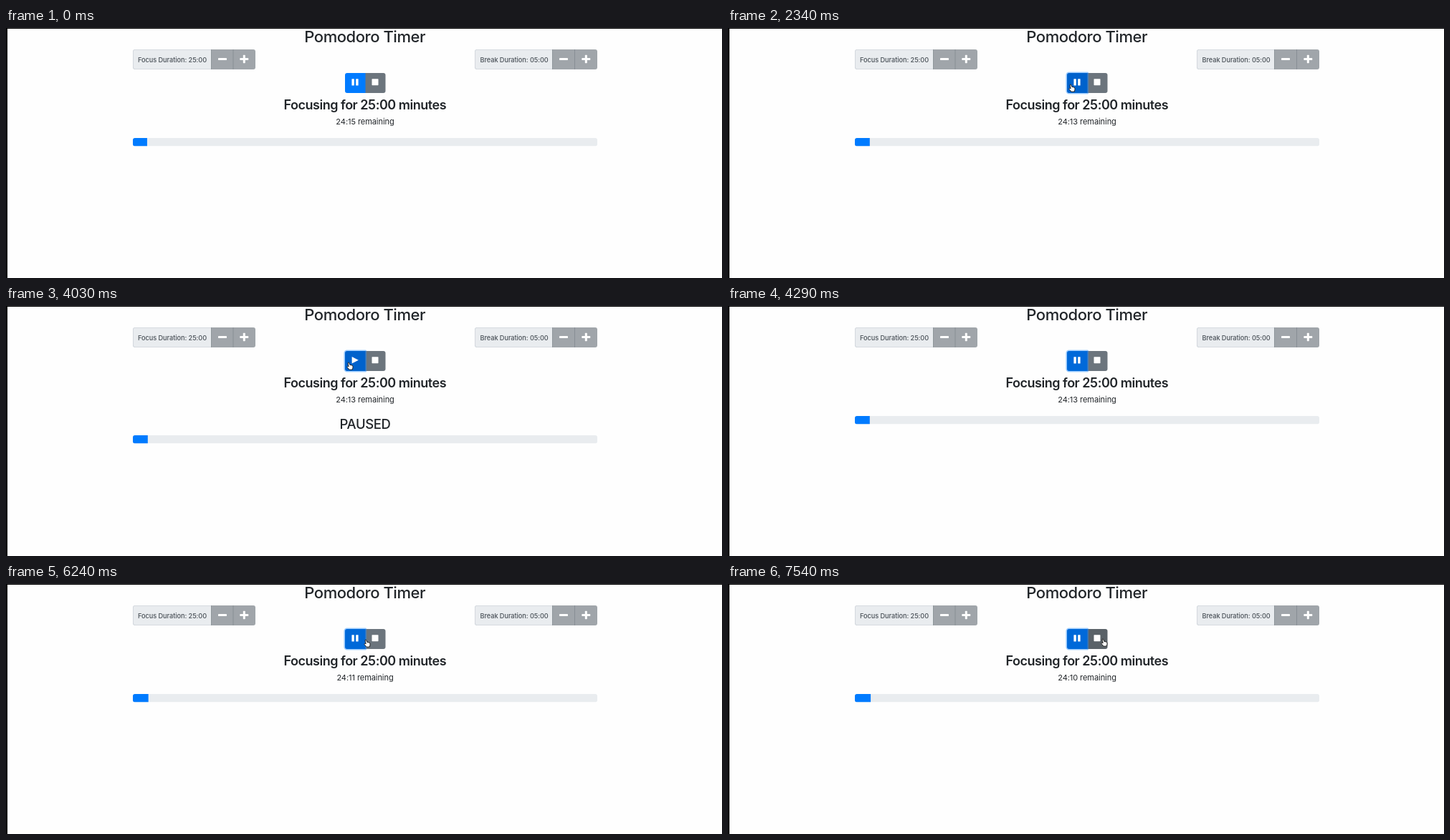
An HTML page with a canvas for the animation above (8000 ms loop, 999x350 px).

```html
<!DOCTYPE html>
<html lang="en">
<head>
<meta charset="utf-8">
<title>Pomodoro Timer</title>
<style>
html, body { margin: 0; width: 100%; height: 100%; overflow: hidden; background: #fefefe; }
canvas, svg { position: absolute; left: 0; top: 0; width: 999px; height: 350px; }
text { font-family: Inter, Roboto, sans-serif; fill: #212529; }
.mid { text-anchor: middle; }
.title { font-size: 22px; font-weight: 530; letter-spacing: -.45px; }
.head { font-size: 18px; font-weight: 560; letter-spacing: -.47px; }
.paused { font-size: 18.5px; font-weight: 530; letter-spacing: -.38px; }
.left { font-size: 11px; letter-spacing: -.06px; }
.label { font-size: 9.2px; font-weight: 450; letter-spacing: -.06px; fill: #495057; }
</style>
</head>
<body>
<canvas id="stage" width="999" height="350"></canvas>
<svg viewBox="0 0 999 350">
  <text class="mid title" x="500.7" y="20">Pomodoro Timer</text>
  <text class="label" x="184" y="47.7">Focus Duration: 25:00</text>
  <text class="label" x="661.5" y="47.7">Break Duration: 05:00</text>
  <text class="mid head" x="500.8" y="113.5">Focusing for 25:00 minutes</text>
  <text class="mid left" x="501" y="135" id="left"></text>
  <text class="mid paused" x="501" y="172" id="paused">PAUSED</text>
</svg>
<script>
const LOOP = 8000, TOTAL = 1500;
const ctx = document.getElementById('stage').getContext('2d');
const leftText = document.getElementById('left');
const pausedText = document.getElementById('paused');

const GRAY = '#6c757d', GRAY_HOVER = '#5a6268', MUTED = '#a0a5aa';
const BLUE = '#007bff', BLUE_HOVER = '#0069d9', BLUE_DOWN = '#0062cc';

// Each track lists [start ms, value]; a value holds until the next start.
const remaining = [[0, 1455], [910, 1454], [1820, 1453], [5200, 1452], [6240, 1451], [7280, 1450]];
const playColor = [[0, BLUE], [1040, '#0071ea'], [1170, BLUE_HOVER], [2080, BLUE_DOWN],
  [2600, BLUE_HOVER], [4030, BLUE_DOWN], [4160, '#0066d3'], [4290, BLUE_HOVER]];
const stopColor = [[0, GRAY], [6370, '#636c73'], [6500, GRAY_HOVER]];
const paused = [[0, false], [2470, true], [4160, false]];
const pointer = [[0, null], [390, [464, 236]], [520, [466, 212]], [650, [469, 176]],
  [780, [473, 136]], [910, [476, 106]], [1040, [479, 89]], [1170, [480, 85]], [1300, [480, 84]],
  [4290, null], [4420, [480, 84]], [6240, [504, 83]], [6370, [511, 83]], [6500, [517, 83]],
  [6760, [521, 82]], [6890, [525, 82]]];

const hand = new Path2D('M-1.8 1L-3-4Q-2.6-5.8-1.3-4.6L-.2-1.6L3-1Q4.4-.2 4 2.2L3.4 5L-1 5.2L-4 1.6Q-4-.2-2.4.4Z');
const arrow = new Path2D('M-3-5.5L-3 4L-.8 2L.7 5.4L2.2 4.7L.8 1.5L3.8 1.4Z');

function at(track, t) {
  let value = track[0][1];
  for (const [start, next] of track) if (t >= start) value = next;
  return value;
}

function box(x, y, w, h, color, radii = 0) {
  ctx.beginPath();
  ctx.roundRect(x, y, w, h, radii);
  ctx.fillStyle = color;
  ctx.fill();
}

function minus(x) {
  box(x - 6, 42, 12, 3, '#fff', .8);
}

function plus(x) {
  minus(x);
  box(x - 1.5, 37.7, 3, 11.5, '#fff', .8);
}

function durationGroup(x, split) {
  const right = x + 171, middle = (split + right) / 2;
  box(x, 30, split - x, 28, '#ced4da', [3, 0, 0, 3]);
  box(x + .8, 30.8, split - x - .8, 26.4, '#e9ecef', [2.4, 0, 0, 2.4]);
  box(split, 30, right - split, 28, MUTED, [0, 3, 3, 0]);
  box(split, 30, .8, 28, '#8b9297');
  box(middle - .4, 30, .8, 28, '#838a90');
  minus(split + 16);
  plus(right - 15.7);
}

function controls(t, isPaused) {
  box(501, 63, 28.5, 28, at(stopColor, t), [0, 3, 3, 0]);
  box(510.5, 71.2, 9, 9, '#fff', .6);
  if (t >= 2080) {
    box(471.4, 61.4, 31.7, 31.2, 'rgba(38,143,255,.45)', [4.5, 1.6, 1.6, 4.5]);
  }
  box(473, 63, 28.5, 28, at(playColor, t), [3, 0, 0, 3]);
  if (isPaused) {
    ctx.fillStyle = '#fff';
    ctx.fill(new Path2D('M482.6 71L491.8 75.8L482.6 80.6Z'));
  } else {
    box(482.4, 71.2, 3.4, 9.2, '#fff', .5);
    box(488.2, 71.2, 3.4, 9.2, '#fff', .5);
  }
}

function progress(seconds, y) {
  ctx.save();
  ctx.beginPath();
  ctx.roundRect(177, y, 648, 11.5, 3);
  ctx.clip();
  box(177, y, 648, 11.5, '#e9ecef');
  box(177, y, 648 * (TOTAL - seconds) / TOTAL + .5, 11.5, BLUE);
  ctx.restore();
}

function drawPointer(pos) {
  if (!pos) return;
  const [x, y] = pos;
  const shape = y < 95 ? hand : arrow;
  ctx.save();
  ctx.translate(x, y);
  ctx.lineJoin = 'round';
  ctx.lineWidth = 1;
  ctx.fillStyle = shape === hand ? '#fff' : '#111';
  ctx.strokeStyle = shape === hand ? '#222' : '#fff';
  ctx.fill(shape);
  ctx.stroke(shape);
  ctx.restore();
}

function draw(t) {
  const seconds = at(remaining, t), isPaused = at(paused, t);
  box(0, 0, 999, 350, '#fefefe');
  box(0, 0, 999, 1, '#000');
  box(0, 0, 2, 350, '#000');
  durationGroup(177, 286);
  durationGroup(654, 762);
  controls(t, isPaused);
  progress(seconds, isPaused ? 181 : 154);
  drawPointer(at(pointer, t));
  const clock = Math.floor(seconds / 60) + ':' + String(seconds % 60).padStart(2, '0');
  leftText.textContent = clock + ' remaining';
  pausedText.style.display = isPaused ? '' : 'none';
}

const begin = performance.now();
function tick() {
  draw((performance.now() - begin) % LOOP);
  requestAnimationFrame(tick);
}
tick();
</script>
</body>
</html>
```
